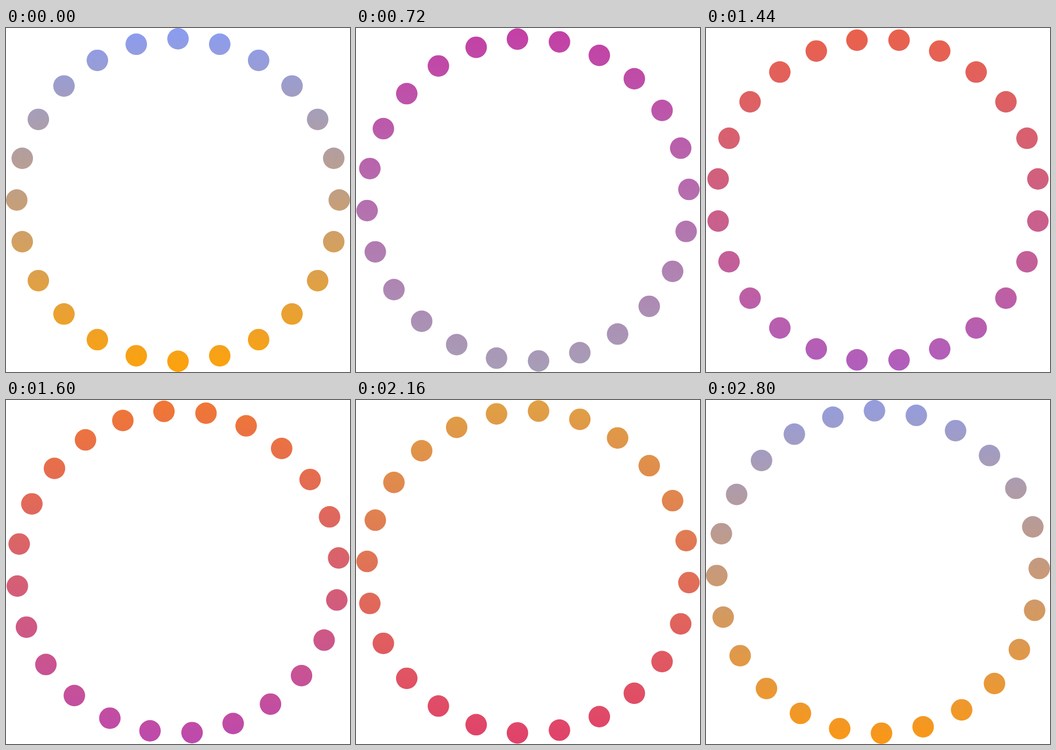
An HTML page with a canvas for the animation above (2880 ms loop, 600x600 px).

```html
<!DOCTYPE html>
<html lang="en">
<head>
<meta charset="utf-8">
<title>Dot ring</title>
<style>
  html, body { margin: 0; height: 100%; overflow: hidden; background: #fff; }
  canvas { display: block; }
</style>
</head>
<body>
<canvas id="stage" width="600" height="600"></canvas>
<script>
const ctx = document.getElementById('stage').getContext('2d');
const SIZE = 600, CENTER = SIZE / 2;
const DOTS = 24, DOT_RADIUS = 18.75, RING_RADIUS = CENTER - DOT_RADIUS;
const LOOP = 2880, STEP = 80;
const SPACING = 2 * Math.PI / DOTS;
const PALETTE = [[138, 156, 241], [214, 32, 139], [253, 162, 10]]; // blue, pink, orange

// Colour at a cyclic palette position; whole numbers hit the palette entries.
function colorAt(position) {
  const i = Math.floor(position), mix = position - i;
  const from = PALETTE[i % 3], to = PALETTE[(i + 1) % 3];
  return `rgb(${from.map((c, k) => Math.round(c + (to[k] - c) * mix))})`;
}

function draw(time) {
  const progress = Math.floor(time % LOOP / STEP) * STEP / LOOP;

  const gradient = ctx.createLinearGradient(0, 0, 0, SIZE);
  gradient.addColorStop(0, colorAt(progress * 3));
  gradient.addColorStop(1, colorAt(progress * 3 + 2));

  ctx.clearRect(0, 0, SIZE, SIZE);
  ctx.fillStyle = gradient;
  for (let i = 0; i < DOTS; i++) {
    const angle = (i + progress * 3) * SPACING;
    ctx.beginPath();
    ctx.arc(CENTER + RING_RADIUS * Math.sin(angle), CENTER - RING_RADIUS * Math.cos(angle),
      DOT_RADIUS, 0, 2 * Math.PI);
    ctx.fill();
  }
}

const start = performance.now();
function tick() {
  draw(performance.now() - start);
  requestAnimationFrame(tick);
}
tick();
</script>
</body>
</html>
```
